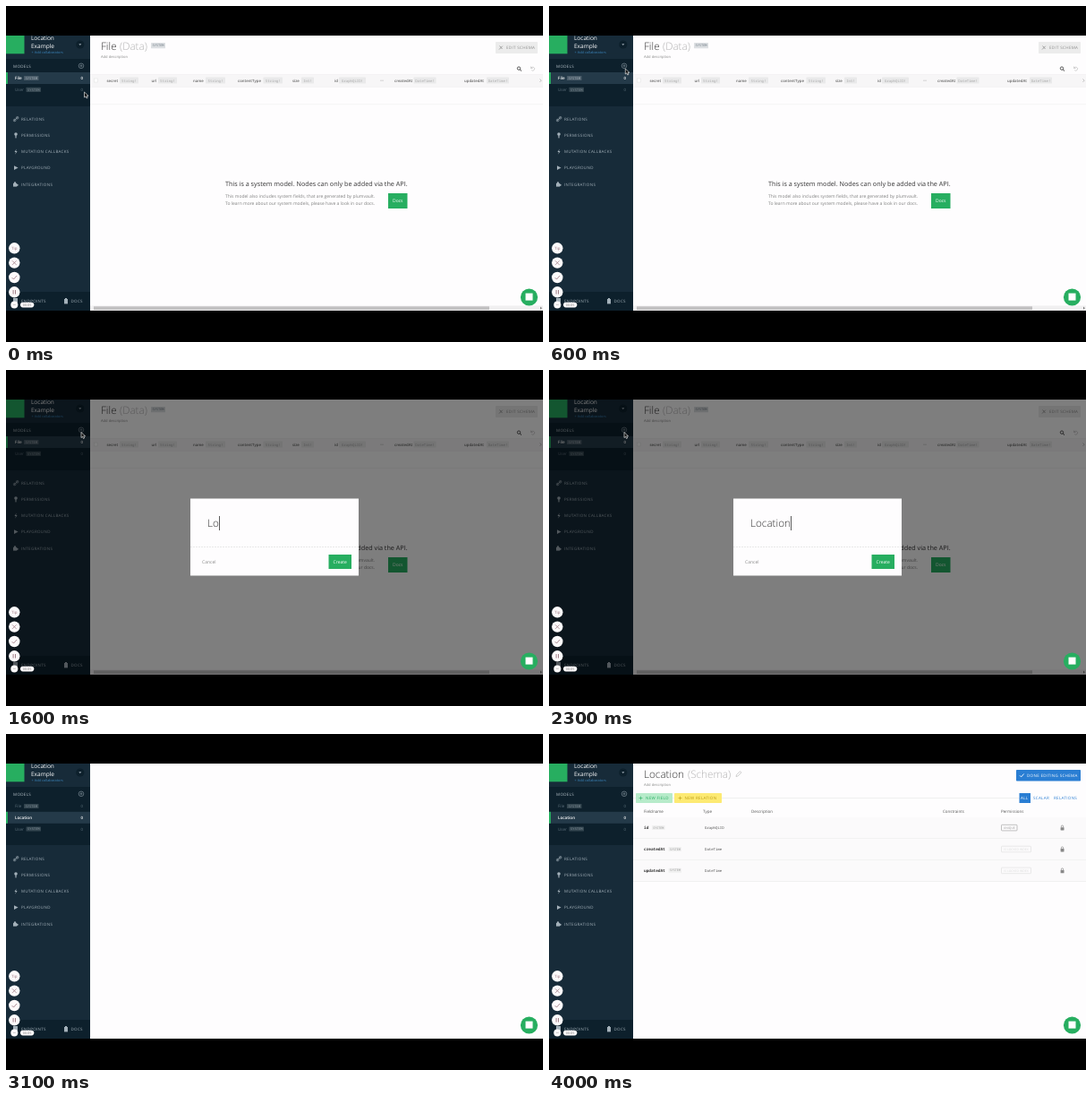
Recreate the animation shown at these times as an HTML page. Size 600 px wide and 375 px high, loop 4100 ms.

```html
<!DOCTYPE html>
<html lang="en">
<head>
<meta charset="utf-8">
<title>Add a model</title>
<style>
html, body { margin: 0; width: 100%; height: 100%; overflow: hidden; background: #000; }
svg { display: block; width: 600px; height: 375px; }
text { font-family: "Open Sans", sans-serif; text-rendering: geometricPrecision; white-space: pre; }
.mono { font-family: "Noto Sans Mono", monospace; }
</style>
</head>
<body>
<svg id="stage" viewBox="0 0 600 375"></svg>
<script>
const LOOP = 4100, STEP = 100;
const OPEN = 700, CARET_OFF = 1000, TYPE = 1500, CLOSE = 2400, ADDED = 3100, LOADED = 3200;
const NAME = 'Location';
const GREEN = '#27ae60', BLUE = '#2a7ed3', DARK = '#0d202c', SIDE = '#172b39';

// time, x, y of the pointer tip
const POINTER = [[0, 87.5, 96], [200, 87.2, 88], [400, 86.2, 75], [600, 85.3, 70], [700, 82.8, 67.7],
  [900, 83.2, 68], [1000, 84, 69.5], [2200, 84, 69.5], [2300, 84, 69.5], [2400, 80.2, 67.5], [4100, 80.2, 67.5]];

const rect = (x, y, w, h, fill, more = '') =>
  `<rect x="${x}" y="${y}" width="${w}" height="${h}" fill="${fill}" ${more}/>`;
const line = (x1, x2, y, c = '#e8e8e8') => rect(x1, y, x2 - x1, .6, c);
const text = (x, y, size, str, fill, more = '') =>
  `<text x="${x}" y="${y}" font-size="${size}" fill="${fill}" ${more}>${str}</text>`;
const caps = (x, y, str, fill, more = '') =>
  text(x, y, 4.5, str, fill, `letter-spacing=".32" ${more}`);
const mono = (x, y, size, str, fill, more = '') =>
  text(x, y, size, str, fill, `class="mono" ${more}`);
const stroke = (d, c, w = .7, more = '') =>
  `<path d="${d}" fill="none" stroke="${c}" stroke-width="${w}" ${more}/>`;
const shape = (d, c) => `<path d="${d}" fill="${c}"/>`;
const disc = (x, y, r, c, more = '') => `<circle cx="${x}" cy="${y}" r="${r}" fill="${c}" ${more}/>`;
const group = (id, body) => `<g id="${id}">${body}</g>`;
const mid = 'text-anchor="middle"';
const badge = (x, y, w, h, str, bg, fg, size) =>
  rect(x, y, w, h, bg, 'rx=".6"') + mono(x + w / 2, y + h / 2 + size * .35, size, str, fg, mid);

function dataPage() {
  const cols = [['secret', 112.5, 127, 21, 'String!'], ['url', 162.5, 170, 21, 'String!'],
    ['name', 209, 223, 22, 'String!'], ['contentType', 259, 287.5, 21.5, 'String!'],
    ['size', 320, 330, 14, 'Int!'], ['id', 367, 372, 30, 'GraphQLID!'],
    ['createdAt', 434, 455.5, 25, 'DateTime!'], ['updatedAt', 512, 537, 25, 'DateTime!']];
  return text(106, 49, 11.7, 'File', '#333', 'font-weight="300"')
    + text(127, 49, 11.7, '(Data)', '#b3b3b3', 'font-weight="300"')
    + badge(162, 41, 16, 6.3, 'SYSTEM', '#dcdfe2', '#6b7780', 3.6)
    + text(106, 58.3, 4.1, 'Add description', '#8a8a8a')
    + rect(547, 40, 47, 13, '#ececec', 'rx=".8"')
    + stroke('M551 48.5l3.8-3.8M551.5 44.5l3 3.5', '#999', .9)
    + caps(559, 48.2, 'EDIT SCHEMA', '#8d8d8d')
    + `<circle cx="573" cy="69.6" r="1.7" fill="none" stroke="#333" stroke-width=".8"/>`
    + stroke('M574.2 70.8l1.8 1.8', '#333', 1)
    + stroke('M586.8 69.2a2 2 0 1 1 .4 2.4M586.5 67.5v2h2', '#b5b5b5', .6)
    + rect(94, 76.5, 506, 13.5, '#f7f6f7') + line(94, 600, 76, '#f0eff0')
    + line(94, 600, 90, '#f0eff0') + line(94, 600, 109.5, '#f0eff0')
    + rect(98.5, 81, 4, 4, '#fff', 'stroke="#e0e0e0" stroke-width=".5"')
    + cols.map(([name, x, bx, bw, type]) =>
        text(x, 84.6, 4.3, name, '#666', 'font-weight="600"')
        + badge(bx, 79.6, bw, 7, type, '#e9e9ea', '#aaa', 4)).join('')
    + stroke('M418 83.2h4', '#bbb', .6)
    + stroke('M596.5 81.5l1.6 1.7-1.6 1.7', '#999', .6)
    + text(245, 201, 7.23, 'This is a system model. Nodes can only be added via the API.', '#333')
    + text(245, 214.4, 5, 'This model also includes system fields, that are generated by plumvault.', '#808080')
    + text(245, 221.9, 5, 'To learn more about our system models, please have a look in our docs.', '#808080')
    + rect(427, 209, 21.5, 17, GREEN)
    + text(437.8, 219.3, 5, 'Docs', '#fff', mid)
    + rect(94, 334.5, 506, 5.5, '#f1f0f1') + rect(98, 335.3, 442, 3.8, '#c2c1c2')
    + shape('M597 335.6l1.8 1.6-1.8 1.6z', '#777');
}

function schemaPage() {
  const heads = [['Fieldname', 106], ['Type', 172], ['Description', 226], ['Constraints', 440], ['Permissions', 505]];
  const rows = [['id', 'GraphQLID', 115, 'UNIQUE', 17.5, '#999'],
    ['createdAt', 'DateTime', 133.5, 'IS LOCKED INDEX', 33, '#dcdcdc'],
    ['updatedAt', 'DateTime', 133.5, 'IS LOCKED INDEX', 33, '#dcdcdc']];
  const row = ([name, type, sx, tag, w, c], i) => {
    const y = 104.5 + 23.9 * i;
    return rect(94, y - 11.5, 506, 23.2, '#fbfafb')
      + mono(106, y + 1.6, 4.4, name, '#333', 'font-weight="700"')
      + badge(sx, y - 2.5, 14.5, 5, 'SYSTEM', '#f0f0f0', '#999', 3.4)
      + mono(174, y + 1.5, 4, type, '#555')
      + rect(505.5, y - 3.2, w, 6.6, 'none', `stroke="${c}" stroke-width=".6" rx=".8"`)
      + text(505.5 + w / 2, y + 1.4, 3.4, tag, c, mid)
      + stroke(`M572.4 ${y}v-1.4a1.1 1.1 0 0 1 2.2 0v1.4`, '#888', .7)
      + rect(571.6, y - .3, 3.9, 3.3, '#888', 'rx=".4"')
      + line(94, 600, y + 11.7);
  };
  return text(106, 49, 11.7, NAME, '#333', 'font-weight="300"')
    + text(155, 49, 11.7, '(Schema)', '#b3b3b3', 'font-weight="300"')
    + stroke('M209 47.5l.5-1.9 4-4 1.4 1.4-4 4z', '#bbb', .7)
    + text(106, 58.3, 4.1, 'Add description', '#8a8a8a')
    + rect(522, 40, 72, 12.5, BLUE, 'rx=".8"')
    + stroke('M526 46.3l1.6 1.6 3-3.4', '#fff', .9)
    + caps(534, 48, 'DONE EDITING SCHEMA', '#fff')
    + line(94, 525, 71.3)
    + rect(97, 66, 41, 11, '#b7ebca', 'rx=".8"')
    + stroke('M100.5 71.5h4M102.5 69.5v4', GREEN, .6) + caps(108, 73.2, 'NEW FIELD', GREEN)
    + rect(140, 66, 53, 11, '#fdea73', 'rx=".8"')
    + stroke('M144.5 71.5h4M146.5 69.5v4', '#b99a10', .6) + caps(151.5, 73.2, 'NEW RELATION', '#b99a10')
    + rect(525.5, 66, 12.5, 11, BLUE)
    + caps(527, 73.2, 'ALL', '#fff') + caps(541, 73.2, 'SCALAR', BLUE) + caps(564, 73.2, 'RELATIONS', BLUE)
    + heads.map(([s, x]) => text(x, 88, 4.5, s, '#555')).join('')
    + line(94, 600, 93) + rows.map(row).join('');
}

function modelRow(y, name, system, active) {
  return (active ? rect(0, y - 6.5, 94, 13, '#243a49') + rect(0, y - 6.5, 2, 13, GREEN) : '')
    + text(10, y + 1.7, 4.6, name, active ? '#fff' : '#5b6d79', active ? 'font-weight="600"' : '')
    + (system ? badge(20 + (name === 'User' ? 2.5 : 0), y - 2.6, 16.5, 5.2, 'SYSTEM',
        active ? '#4a5c69' : '#33454f', active ? '#a9b5bd' : '#83919a', 3.7) : '')
    + text(84.8, y + 1.6, 4.4, '0', active ? '#fff' : '#5b6d79', mid + (active ? ' font-weight="600"' : ''));
}

function sidebar() {
  const c = '#a3b0b9';
  const nav = [
    ['RELATIONS', 126.3, stroke('M9 128.5l1.5-2.5M11 126l2.5-2', c, .8)
      + `<circle cx="9.7" cy="127.5" r="1.3" fill="none" stroke="${c}" stroke-width=".6"/><circle cx="12.6" cy="124.8" r="1.3" fill="none" stroke="${c}" stroke-width=".6"/>`],
    ['PERMISSIONS', 144.4, disc(11, 143, 1.8, c) + rect(10.4, 144, 1.2, 3.4, c)],
    ['MUTATION CALLBACKS', 162.5, shape('M11.7 159.5l-2.2 3.4h1.5l-.8 2.8 2.4-3.6h-1.5z', c)],
    ['PLAYGROUND', 180.6, shape('M9 178.3l4.6 2.3-4.6 2.3z', c)],
    ['INTEGRATIONS', 198.8, rect(8, 198, 4.2, 3.6, c) + disc(10, 197.4, 1.2, c) + disc(12.6, 199.8, 1.1, c)]];
  return rect(0, 33, 94, 307, SIDE)
    + `<rect id="models" x="0" y="59" width="94" height="53" fill="${DARK}"/>`
    + rect(0, 33, 20.5, 20.5, GREEN)
    + text(28, 37.6, 6.5, NAME, '#fff') + text(28, 46.6, 6.5, 'Example', '#fff')
    + text(28.5, 53, 3.9, '+ Add collaborators', '#3b86bd')
    + rect(0, 53.6, 94, 5.4, SIDE)
    + disc(82.8, 43, 4.6, DARK) + shape('M81.3 42.3h3l-1.5 1.8z', '#a3b0b9')
    + caps(8, 68.6, 'MODELS', '#b4bfc7')
    + `<circle cx="84" cy="66.8" r="2.8" fill="none" stroke="#8c9aa4" stroke-width=".6"/>`
    + stroke('M82.5 66.8h3M84 65.3v3', '#8c9aa4', .6)
    + group('before', modelRow(80.5, 'File', 1, 1) + modelRow(93.3, 'User', 1, 0))
    + group('after', modelRow(80.5, 'File', 1, 0) + modelRow(93.3, NAME, 0, 1) + modelRow(106, 'User', 1, 0))
    + group('nav', nav.map(([s, y, icon]) => icon + caps(17, y + 1.7, s, c)).join(''))
    + rect(0, 319, 94, 21, DARK)
    + caps(17, 331.2, 'ENDPOINTS', c) + rect(8, 326, 5, 5, c)
    + rect(65, 327, 4, 5.4, c) + rect(66, 326, 2, 1.2, c) + caps(72.5, 331.2, 'DOCS', c);
}

function recorder() {
  const c = '#96707a';
  return [270.3, 286.6, 303, 319.3].map(y => disc(9.3, y, 6.2, '#fdfafb')).join('')
    + text(9.3, 271.8, 4.4, 'Tip', c, mid)
    + stroke('M7 284.3l4.6 4.6M11.6 284.3l-4.6 4.6', c, .7)
    + stroke('M6.7 303.2l1.8 1.8 3.6-4', c, .8)
    + stroke('M8.1 317v4.6M10.5 317v4.6', c, .9)
    + disc(9.3, 333.4, 4, '#fdfafb') + stroke('M7.8 333.4h3', '#999', .5)
    + rect(16, 330.8, 15.3, 5.6, '#fdfafb', 'rx="2.8"') + text(23.6, 335, 3.8, '00:05', '#777', mid);
}

function modal() {
  return rect(206, 143.5, 188, 86, '#fefdfe')
    + text(225.3, 175, 11.7, 'New Model...', '#c4c4c4', 'id="hint" font-weight="300"')
    + text(225, 175, 11.7, '', '#333', 'id="typed" font-weight="300"')
    + rect(224.6, 163, .8, 16, '#333', 'id="caret"')
    + stroke('M206 197.5h188', '#dadada', .6, 'stroke-dasharray="2 1"')
    + text(219, 215.6, 5, 'Cancel', '#888')
    + rect(360.5, 206, 25.5, 16, GREEN) + text(373.2, 215.8, 5, 'Create', '#fff', mid);
}

const stage = document.getElementById('stage');
stage.innerHTML = rect(0, 0, 600, 375, '#000') + rect(94, 33, 506, 307, '#fefdfe')
  + group('data', dataPage()) + group('schema', schemaPage()) + sidebar()
  + group('dialog', rect(0, 33, 600, 307, '#000', 'opacity=".5"') + modal())
  + recorder()
  + disc(584.5, 325, 9.6, GREEN) + rect(580.5, 320.6, 8, 8, '#fff')
  + group('pointer', '<path d="M0 0v6l1.5-1.2 1 2.2 1.2-.6-1-2.1h1.9z" fill="#111" stroke="#fff" stroke-width=".6"/>');

const el = id => document.getElementById(id);
const show = (id, on) => el(id).style.display = on ? '' : 'none';

function pointerAt(t) {
  const i = POINTER.findIndex(p => p[0] > t);
  const [t0, x0, y0] = POINTER[i - 1], [t1, x1, y1] = POINTER[i];
  const k = (t - t0) / (t1 - t0);
  return [x0 + (x1 - x0) * k, y0 + (y1 - y0) * k];
}

function draw(t) {
  const added = t >= ADDED;
  const count = t < TYPE ? 0 : Math.min(NAME.length, (t - TYPE) / STEP + 1);
  show('data', !added);
  show('schema', t >= LOADED);
  show('before', !added);
  show('after', added);
  el('models').setAttribute('height', added ? 65 : 53);
  el('nav').setAttribute('transform', `translate(0 ${added ? 13 : 0})`);

  show('dialog', t >= OPEN && t < CLOSE);
  show('hint', !count);
  show('caret', t < CARET_OFF || count);
  const typed = el('typed');
  typed.textContent = NAME.slice(0, count);
  el('caret').setAttribute('x', 224.8 + (count ? typed.getComputedTextLength() + .4 : 0));

  show('pointer', !added);
  el('pointer').setAttribute('transform', `translate(${pointerAt(t)})`);
}

const start = performance.now();
function tick() {
  const t = (performance.now() - start) % LOOP;
  draw(Math.floor(t / STEP) * STEP);
  requestAnimationFrame(tick);
}
tick();
</script>
</body>
</html>
```
